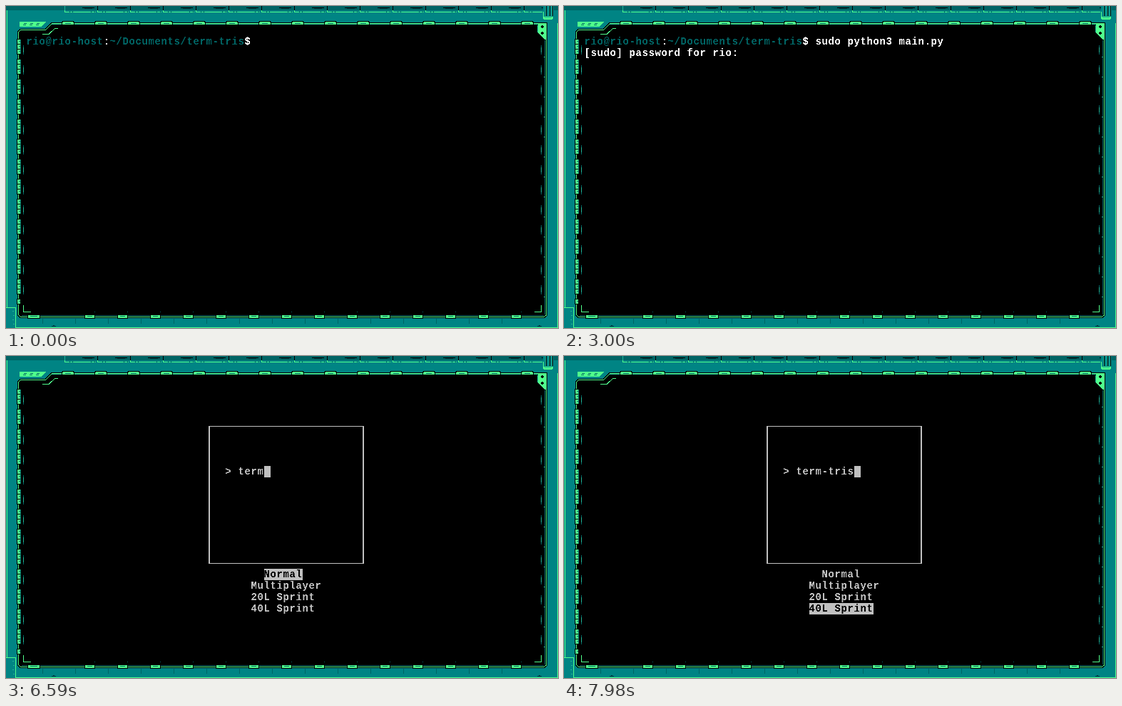
An HTML page that plays this animation: 774 by 451 pixels, repeating every 8 s.

```html
<!DOCTYPE html>
<html lang="en">
<head>
<meta charset="utf-8">
<title>Terminal</title>
<style>
html, body { margin: 0; width: 100%; height: 100%; overflow: hidden; background: #008484; }
svg { display: block; }
text {
  font: bold 14px "Liberation Mono", "DejaVu Sans Mono", monospace;
  letter-spacing: 0.6px;
  white-space: pre;
}
</style>
</head>
<body>
<svg id="stage" width="774" height="451" viewBox="0 0 774 451">
  <filter id="crisp" filterUnits="userSpaceOnUse" x="0" y="0" width="774" height="451" color-interpolation-filters="sRGB">
    <feComponentTransfer><feFuncA type="linear" slope="2.4" intercept="-0.7"/></feComponentTransfer>
  </filter>
  <g id="frame" shape-rendering="crispEdges"></g>
  <g id="blocks" shape-rendering="crispEdges"></g>
  <g id="words" filter="url(#crisp)"></g>
</svg>
<script>
const TEAL = '#008484', DARK = '#006464', DEEP = '#003c40', MID = '#20b496',
      GREEN = '#50ff8c', BLACK = '#000', WHITE = '#fff', GREY = '#c0c0c0';
const $ = id => document.getElementById(id);
const frame = $('frame'), blocks = $('blocks'), words = $('words');

function add(parent, tag, attrs) {
  const el = document.createElementNS('http://www.w3.org/2000/svg', tag);
  for (const k in attrs) el.setAttribute(k, attrs[k]);
  return parent.appendChild(el);
}
const rect = (x, y, width, height, fill, parent = frame) =>
  add(parent, 'rect', { x, y, width, height, fill });
const path = (d, fill, stroke = 'none', width = 1) =>
  add(frame, 'path', { d, fill, stroke, 'stroke-width': width });
const repeat = (n, start, step, draw) => {
  for (let i = 0; i < n; i++) draw(start + i * step, i);
};

function drawEdges() {
  rect(0, 0, 774, 451, TEAL);
  rect(0, 0, 774, 6, DARK);
  rect(1, 6, 1, 416, GREEN);
  rect(773, 24, 1, 427, GREEN);
  rect(14, 450, 760, 1, GREEN);

  // top rail
  repeat(15, 82, 46, (x, i) => {
    const w = i < 14 ? 46 : 28;
    rect(x, 0, 1, 8, i ? BLACK : MID);
    rect(x, 8, w - 2, 1, GREEN);
    rect(x, 6, 1, 3, GREEN);
    [7, 11, 37, 42].filter(dx => dx < w).forEach(dx => rect(x + dx, 7, 1, 2, DARK));
    rect(x + 25, 2, 17, 1, BLACK);
    rect(x + 28, 3, 11, 1, DEEP);
  });

  // cable at the top right
  rect(753, 0, 15, 14, TEAL);
  [757, 762, 766].forEach(x => {
    rect(x, 0, 1, 14, BLACK);
    rect(x - 1, 0, 1, 14, MID);
  });
  rect(753, 8, 1, 7, GREEN);
  rect(753, 15, 14, 3, GREEN);
  rect(755, 16, 10, 1, MID);
  rect(754, 18, 12, 1, GREEN);

  // gauge at the bottom left
  rect(0, 422, 14, 1, GREEN);
  rect(13, 422, 1, 29, GREEN);
  repeat(4, 427, 6, (y, i) => rect(i % 2 ? 10 : 9, y, 2, 1, MID));

  // marks below the panel
  repeat(15, 51, 46, x => rect(x, 438, 1, 7, DARK));
  [64, 745].forEach(x => {
    rect(x, 448, 6, 1, DEEP);
    rect(x + 2, 447, 2, 1, DEEP);
  });
}

function drawPanel() {
  const outline = 'M17.5 431V36.5L20.5 33.5H55.5L64.5 24.5H757.5V433L754.5 435.5H20.5L17.5 432.5Z';
  path(outline, BLACK, BLACK, 3);
  path(outline, 'none', GREEN);
  rect(64, 25, 682, 1, MID);
  rect(755, 48, 1, 384, DARK);
  rect(22, 433, 732, 1, DARK);

  // ladder on the left, dashes on both sides
  repeat(14, 46, 28, (y, i) => {
    const rungs = i < 13 ? 3 : 1;
    rect(15, y, 6, rungs * 7 + 1, BLACK);
    repeat(rungs, y + 1, 7, by => {
      rect(16, by, 4, 6, GREEN);
      rect(18, by + 2, 2, 1, DARK);
      rect(16, by + 4, 1, 1, MID);
    });
    if (i === 13) return;
    rect(20, y + 1, 1, 20, DARK);
    [24, 750].forEach(x => {
      rect(x, y + 9, 1, 13, DARK);
      rect(x, y + 12, 1, 7, MID);
    });
    rect(754, y + 25, 2, 1, MID);
  });

  // tabs along the top and bottom
  repeat(15, 79, 46, x => {
    rect(x, 21, 16, 1, BLACK);
    rect(x - 1, 22, 18, 5, BLACK);
    rect(x + 1, 22, 14, 1, GREEN);
    rect(x, 23, 16, 3, GREEN);
    rect(x + 4, 24, 8, 1, DARK);
  });
  const tab = (x, w) => {
    rect(x - 1, 432, w + 2, 6, BLACK);
    rect(x, 433, w, 4, GREEN);
    rect(x + 3, 434, w - 6, 1, DARK);
  };
  tab(31, 16);
  repeat(14, 111, 46, x => tab(x, 13));
  repeat(14, 124, 46, x => rect(x, 428, 1, 1, DARK));

  // corner brackets
  path('M24.5 419V428.5H35M750.5 419V428.5H741', 'none', GREEN);
  path('M51 39.5H60L68.5 31.5H73', 'none', GREEN);

  // label plate
  path('M19 22H56L49 29H19Z', GREEN);
  [25, 34, 43].forEach(x => {
    rect(x, 24, 4, 1, DARK);
    rect(x - 1, 26, 4, 1, DARK);
  });

  // bolted corner
  path('M746 25H758V47H755L746 38Z', GREEN);
  rect(745, 27, 1, 10, MID);
  [29, 38].forEach(y => {
    rect(750, y - 1, 4, 2, BLACK);
    rect(751, y - 2, 2, 4, BLACK);
  });
}

// character grid, 9 by 16
const cellX = col => 29 + 9 * col, cellY = row => 42 + 16 * row;

function print(str, col, row, fill = GREY) {
  add(words, 'text', { x: cellX(col) - 0.5, y: cellY(row) + 12, fill }).textContent = str;
}
const fillCells = (col, row, n) => rect(cellX(col), cellY(row), 9 * n, 16, GREY, blocks);

const USER = 'rio', HOST = 'rio-host', COMMAND = 'sudo python3 main.py', TITLE = 'term-tris';
const MENU = [['Normal', 37], ['Multiplayer', 35], ['20L Sprint', 35], ['40L Sprint', 35]];
const CLEAR = 5320, BOX = 5440, CURSOR = 5500, PICK = 7980, LOOP = 8000;

// [time, letters shown]
const TYPING = [
  [0, 0], [700, 1], [800, 2], [900, 3], [1000, 4], [1230, 6], [1350, 7],
  [1500, 8], [1575, 9], [1650, 10], [1725, 11], [1800, 12],
  [1990, 14], [2090, 15], [2190, 16], [2280, 17], [2480, 18], [2680, 19], [2770, 20]
];
// [time, letters shown, cursor place or -1]
const NAMING = [
  [0, 0, -1], [CURSOR, 0, 0], [5990, 1, 1], [6110, 2, 2], [6240, 2, 3], [6360, 3, 3],
  [6480, 3, 4], [6590, 4, 4], [6700, 4, 5], [6800, 5, 5], [6900, 5, 6], [7010, 6, 6],
  [7120, 6, 7], [7220, 7, 7], [7300, 7, 8], [7390, 8, 8], [7470, 9, -1], [7800, 9, 9]
];
const at = (steps, t) => steps.filter(s => s[0] <= t).pop();

function drawShell(t) {
  const login = USER + '@' + HOST, dir = '~/Documents/' + TITLE;
  const dirCol = login.length + 1, end = dirCol + dir.length;
  print(login, 0, 0, DARK);
  print(':', login.length, 0, WHITE);
  print(dir, dirCol, 0, DARK);
  print('$ ' + COMMAND.slice(0, at(TYPING, t)[1]), end, 0, WHITE);
  if (t >= 3000) print(`[sudo] password for ${USER}:`, 0, 1, WHITE);
}

function drawMenu(t) {
  add(blocks, 'path', { d: 'M284 98H502V291H284ZM286 99V290H500V99Z', fill: GREY, 'fill-rule': 'evenodd' });
  const picked = t < PICK ? 0 : 3;
  MENU.forEach(([label, col], i) => {
    if (i === picked) fillCells(col, 16 + i, label.length);
    print(label, col, 16 + i, i === picked ? BLACK : GREY);
  });
  const [, shown, cursor] = at(NAMING, t);
  print('>', 31, 7);
  print(TITLE.slice(0, shown), 33, 7);
  if (cursor >= 0) fillCells(33 + cursor, 7, 1);
}

function draw(t) {
  words.replaceChildren();
  blocks.replaceChildren();
  if (t < CLEAR) drawShell(t);
  else if (t >= BOX) drawMenu(t);
}

drawEdges();
drawPanel();
const start = performance.now();
function tick() {
  draw((performance.now() - start) % LOOP);
  requestAnimationFrame(tick);
}
tick();
</script>
</body>
</html>
```
